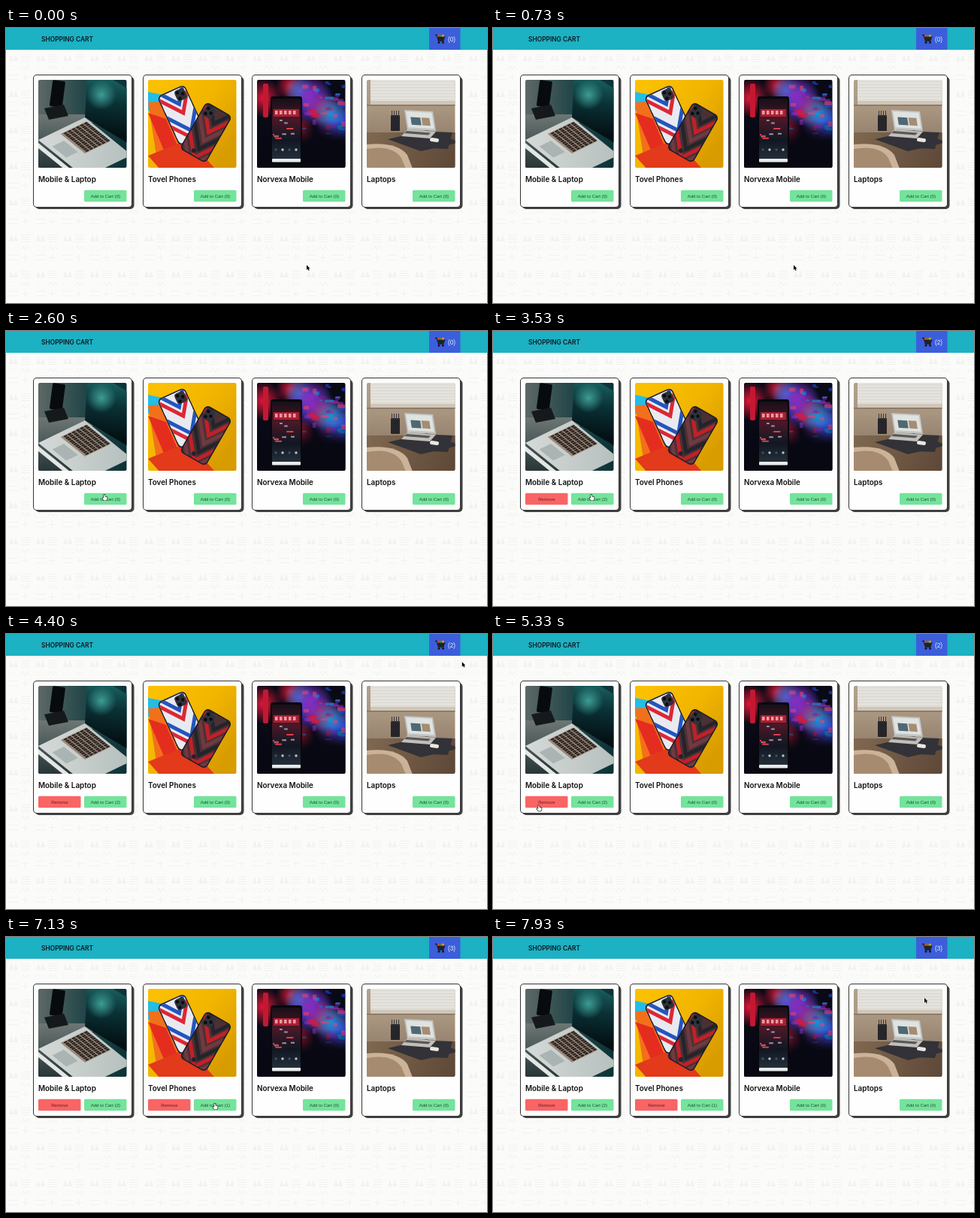
Animation, 640 px wide and 366 px high, one loop 8000 ms. Source, as an HTML page with a canvas:

```html
<!DOCTYPE html>
<html lang="en">
<head>
<meta charset="utf-8">
<title>Shopping cart</title>
<style>
html, body { margin: 0; width: 100%; height: 100%; overflow: hidden; background: #fbfbfa; }
canvas { display: block; width: 640px; height: 366px; }
</style>
</head>
<body>
<canvas id="stage"></canvas>
<script>
const W = 640, H = 366, LOOP = 8000, FPS = 15, PHOTO = 117.5;
const dpr = window.devicePixelRatio || 1;
const TITLE = 'Inter, "Open Sans", sans-serif';
const LABEL = '"Liberation Sans", Arial, sans-serif';
const GREEN = '#74e39b', RED = '#f96464';

const stage = document.getElementById('stage');
const page = document.createElement('canvas');
for (const c of [stage, page]) { c.width = W * dpr; c.height = H * dpr; }
const out = stage.getContext('2d');
let g = page.getContext('2d');
g.scale(dpr, dpr);
out.scale(dpr, dpr);

function rect(x, y, w, h, fill, r = 0) {
  g.fillStyle = fill;
  g.beginPath();
  g.roundRect(x, y, w, h, r);
  g.fill();
}
function dot(x, y, r, fill) {
  rect(x - r, y - r, r * 2, r * 2, fill, r);
}
function shape(d, fill, stroke, width = 1) {
  const p = new Path2D(d);
  if (stroke) {
    g.strokeStyle = stroke;
    g.lineWidth = width;
    g.stroke(p);
  }
  if (fill) {
    g.fillStyle = fill;
    g.fill(p);
  }
}
function glow(x, y, r, color) {
  const f = g.createRadialGradient(x, y, 0, x, y, r);
  f.addColorStop(0, color);
  f.addColorStop(1, color + '00');
  g.fillStyle = f;
  g.fillRect(x - r, y - r, r * 2, r * 2);
}
function fade(x0, y0, x1, y1, ...colors) {
  const f = g.createLinearGradient(x0, y0, x1, y1);
  colors.forEach((c, i) => f.addColorStop(i / (colors.length - 1), c));
  return f;
}
// draws in a unit square laid along the edges u and v
function plane(x, y, u, v, draw) {
  g.save();
  g.transform(u[0], u[1], v[0], v[1], x, y);
  if (typeof draw === 'string') rect(0, 0, 1, 1, draw);
  else draw();
  g.restore();
}
function turned(x, y, angle, draw) {
  g.save();
  g.translate(x, y);
  g.rotate(angle);
  draw();
  g.restore();
}
function text(str, x, y, font, color, align = 'left') {
  g.font = font;
  g.fillStyle = color;
  g.textAlign = align;
  g.fillText(str, x, y);
}
function seeded(s) {
  return () => (s = (s * 16807) % 2147483647) / 2147483647;
}

function deskPhoto() {
  rect(0, 0, 118, 118, fade(0, 0, 118, 0, '#5d6865', '#25474a', '#0c3236'));
  rect(0, 46, 72, 72, fade(0, 46, 0, 118, '#6d7775', '#273537'));
  turned(26, 18, .13, () => rect(-9, -17, 17, 35, '#080b0e', 2));
  plane(8, 38, [26, -5], [6, 15], '#15191b');
  plane(66, -20, [60, 36], [-4, 70],
    () => rect(0, 0, 1, 1, fade(.2, 0, .6, 1, '#1c6c6a', '#0a3236', '#041114')));
  glow(84, 20, 20, '#3d9c95');
  plane(0, 80, [62, -30], [62, 50], () => {
    rect(0, 0, 1, 1, fade(0, 0, 1, 1, '#d5dad8', '#b5bfbd'));
    rect(.4, .08, .55, .52, '#9c8878');
    for (let r = 0; r < 6; r++)
      for (let c = 0; c < 12; c++)
        rect(.885 - r * .088, .09 + c * .042, .066, .034, '#292321');
    rect(.08, .22, .25, .3, '#aab4b2');
  });
  plane(0, 84, [62, 50], [0, 7], '#e3e7e4');
}

function phoneCase(x, y, angle, side, base, colors) {
  turned(x, y, angle, () => {
    rect(-20, -36, 40, 72, '#171b2a', 6);
    g.beginPath();
    g.roundRect(-18.5, -34.5, 37, 69, 5);
    g.clip();
    rect(-20, -36, 40, 72, base);
    for (let i = 0; i < 7; i++) {
      const k = -44 + i * 13;
      shape(`M-20 ${k}L3 ${k + 29}L20 ${k + 4}`, null, colors[i % 3], 5);
    }
    rect(side * 10 - 7, -33, 14, 15, '#303239', 4);
    for (let i = 0; i < 3; i++)
      dot(side * 10 + (i % 2 ? 3 : -3), -29.5 + i * 4, 2.3, '#0b0d12');
    dot(-2, 29, 3, '#20242d');
  });
}
function casesPhoto() {
  rect(0, 0, 118, 118, fade(20, 0, 118, 80, '#fbc002', '#f1b500', '#d89b00'));
  plane(0, 16, [40, 8], [0, 25], '#23bde5');
  plane(0, 30, [36, -2], [14, 90], '#f2701a');
  plane(0, 44, [24, 8], [28, 66], '#e52d1f');
  plane(0, 101, [54, -22], [34, 38], '#e23a1a');
  phoneCase(45, 47, -.43, 1, '#e8eaf0', ['#2455be', '#dd2734', '#e8eaf0']);
  phoneCase(77, 70, .52, -1, '#4b3035', ['#24242b', '#c22027', '#6f3a40']);
}

function neonPhoto() {
  const rnd = seeded(83);
  const neon = ['#e01838', '#2447e0', '#8a2bc0', '#1592d8', '#f0406c'];
  rect(0, 0, 118, 118, '#090a16');
  for (let i = 0; i < 9; i++)
    glow(45 + (i * 29) % 75, 8 + (i * 23) % 62, 20 + rnd() * 12, neon[i % 4]);
  glow(8, 24, 26, neon[0]);
  g.globalAlpha = .6;
  for (let i = 0; i < 40; i++)
    rect(60 + rnd() * 56, rnd() * 72, 3 + rnd() * 10, 1 + rnd() * 6, neon[i % 5], 1);
  g.globalAlpha = 1;
  rect(8, 5, 7, 45, '#c41832', 2);
  rect(0, 54, 118, 64, fade(0, 54, 0, 88, '#07081200', '#070812'));
  rect(18, 22, 42, 94, '#07080e', 3);
  rect(20, 25, 38, 83, fade(0, 25, 0, 108, '#180f18', '#4a1827', '#111722', '#27323c'), 2);
  rect(22, 39, 34, 10, '#a92034');
  for (let i = 0; i < 5; i++) rect(24 + i * 6, 41, 3.5, 5, '#ee9aa0');
  for (let i = 0; i < 9; i++)
    rect(21 + rnd() * 28, 53 + rnd() * 24, 2 + rnd() * 8, 2, i % 2 ? '#d8404c' : '#8b9bad');
  for (let i = 0; i < 4; i++) dot(25 + i * 9, 93, 1.7, i % 2 ? '#b7c5d1' : '#3a5068');
  rect(20, 105, 38, 4.5, '#e8ebec', 1);
}

function officePhoto() {
  rect(0, 0, 118, 118, fade(0, 0, 0, 80, '#b3a28f', '#a8957f', '#927e6b'));
  rect(5, 0, 113, 28, '#e4e2dc');
  for (let y = 2; y < 28; y += 4) rect(5, y, 113, 1, '#d9d7d0');
  rect(5, 28, 113, 5, '#cfc6b8');
  rect(0, 33, 118, 1.5, '#83715f');
  rect(0, 70, 118, 48, fade(0, 70, 118, 118, '#806850', '#5d4737'));
  plane(28, 79, [52, -12], [44, 16], '#323238');
  plane(66, 68, [48, 2], [-6, 22], '#323238');
  rect(32, 47, 12, 21, '#26262a', 1);
  for (let i = 0; i < 4; i++) rect(33 + i * 3, 41, 1, 8, '#3a363a');
  plane(50, 40, [38, 2], [4, 26], () => {
    rect(0, 0, 1, 1, '#c3c5c4');
    rect(.05, .07, .9, .82, '#dfe3e1');
    rect(.18, .35, .34, .4, '#4f6874');
    rect(.56, .35, .28, .4, '#a58c72');
  });
  plane(54, 66, [38, 3], [-8, 9], '#c2bfb9');
  plane(53, 68, [32, 2.5], [-3, 3], '#57585a');
  turned(90, 80, .12, () => rect(-6, -2.5, 12, 5, '#eae7e1', 2.5));
  shape('M0 86Q40 82 54 100L61 118H0Z', '#cbb399');
  shape('M0 92Q34 86 46 104L52 118H0Z', '#a68b70');
}

const cards = [
  ['Mobile & Laptop', deskPhoto],
  ['Tovel Phones', casesPhoto],
  ['Norvexa Mobile', neonPhoto],
  ['Laptops', officePhoto]
].map(([name, photo], i) => ({ name, photo, x: Math.round(36 + i * 145.5) }));

function backdrop() {
  rect(0, 0, W, H, '#fbfbfa');
  const ink = '#f2f2f1';
  for (let y = 30; y < H; y += 48) {
    for (let x = 0; x < W; x += 36) {
      turned(x, y, 0, () => {
        shape('M4 14L7 5L10 14ZM10 14L13 5L16 14Z', ink);
        shape('M20 25l3-5l3 5l3-5l3 5M25.5 31v9M21 35.5h9M3 32.5h14M3 38.5h14', null, ink);
        for (let i = 0; i < 4; i++) {
          rect(20, 5 + i * 3, 12, 1, ink);
          dot(4 + i * 4, 21, .8, ink);
          dot(4 + i * 4, 25, .8, ink);
        }
      });
    }
  }
}

function cartIcon() {
  shape('M571 9.5h2.5l2 7.5h7', null, '#171b25', 1.6);
  shape('M573 11H584.5L582.5 17H575Z', '#1d2229');
  ['#c5483f', '#4a8448', '#d38c36'].forEach((c, i) => dot(575.5 + i * 3, 10.3, 1.8, c));
  for (const x of [576, 581.5]) dot(x, 19.3, 1.5, '#15171d');
}

function drawPage() {
  backdrop();
  rect(0, 0, W, 29, '#1cb1c3');
  rect(563, 0, 41.5, 29, '#3c5edb');
  text('SHOPPING CART', 47, 18, `600 8.4px ${TITLE}`, '#101820');
  cartIcon();
  for (const c of cards) {
    rect(c.x + 3, 65, 131.5, 176, '#414141', 5);
    rect(c.x, 62, 132, 177, '#363636', 5);
    rect(c.x + 1, 63, 130, 175, '#fdfefd', 4);
    turned(c.x + 7, 69, 0, () => {
      g.beginPath();
      g.roundRect(0, 0, PHOTO, 117, 2);
      g.clip();
      c.photo();
    });
    text(c.name, c.x + 7, 205, `600 9.9px ${TITLE}`, '#111');
  }
}

// cursor stops: time, x, y
const path = [
  [900, 400, 315.5], [1400, 226, 286], [2600, 131, 218], [3700, 131, 218],
  [4250, 609, 70], [4650, 594, 4], [5330, 61, 228], [5750, 75, 243],
  [6400, 206, 223], [6900, 278, 222], [7300, 278, 222], [7800, 440, 150], [7933, 574, 81]
];
const clicks = [[2870, 0], [3270, 0], [7100, 1]]; // time, card

function slope(i, k) {
  const p = path[i], q = path[i + 1];
  return p && q ? (q[k] - p[k]) / (q[0] - p[0]) : 0;
}
// harmonic mean of both slopes: smooth without overshoot
function tangent(i, k) {
  const a = slope(i - 1, k), b = slope(i, k);
  return a * b <= 0 ? 0 : 2 * a * b / (a + b);
}
function along(time, k) {
  const t = Math.min(Math.max(time, path[0][0]), path[path.length - 1][0]);
  let i = 0;
  while (i < path.length - 2 && t >= path[i + 1][0]) i++;
  const p = path[i], q = path[i + 1], d = q[0] - p[0];
  const u = (t - p[0]) / d, v = 1 - u;
  return p[k] * v * v * (1 + 2 * u) + q[k] * u * u * (3 - 2 * u) +
    d * u * v * (tangent(i, k) * v - tangent(i + 1, k) * u);
}

function button(x, label, fill) {
  rect(x, 215.7, 56.5, 15.5, fill, 1.5);
  text(label, x + 28.3, 225.5, `6px ${LABEL}`, fill === RED ? '#641f25' : '#1d4f33', 'center');
}
function cursor(x, y, over) {
  turned(x, y, 0, () => {
    if (over) {
      shape('M-.8 0H.4L.8 2.5L3.5 3.2L3.6 5.3L2.7 7.4H-.7L-2.7 4.6L-2 3.8L-.8 4.6Z', '#fff', '#222', 1.4);
    } else {
      shape('M0 0V6.4L1.5 5.1L2.6 7.4L3.7 6.9L2.7 4.7H4.6Z', '#000', '#fff');
    }
  });
}

function render(now) {
  const t = Math.floor((now % LOOP) * FPS / 1000 + .06) * 1000 / FPS % LOOP;
  const done = clicks.filter(c => c[0] <= t);
  const x = along(t, 1), y = along(t, 2);
  let over = x > 563 && x < 604.5 && y < 29;
  out.drawImage(page, 0, 0, W, H);
  text(`(${done.length})`, 588, 17.5, `8.2px ${LABEL}`, '#e9edfb');
  cards.forEach((c, i) => {
    const n = done.filter(d => d[1] === i).length;
    button(c.x + 68, `Add to Cart (${n})`, GREEN);
    if (n) button(c.x + 7, 'Remove', RED);
    const left = c.x + (n ? 7 : 68);
    if (y > 215.7 && y < 231.2 && x > left && x < c.x + 124.5) over = true;
  });
  cursor(x, y, over);
}

drawPage();
g = out;
function tick() {
  render(performance.now());
  requestAnimationFrame(tick);
}
tick();
</script>
</body>
</html>
```
